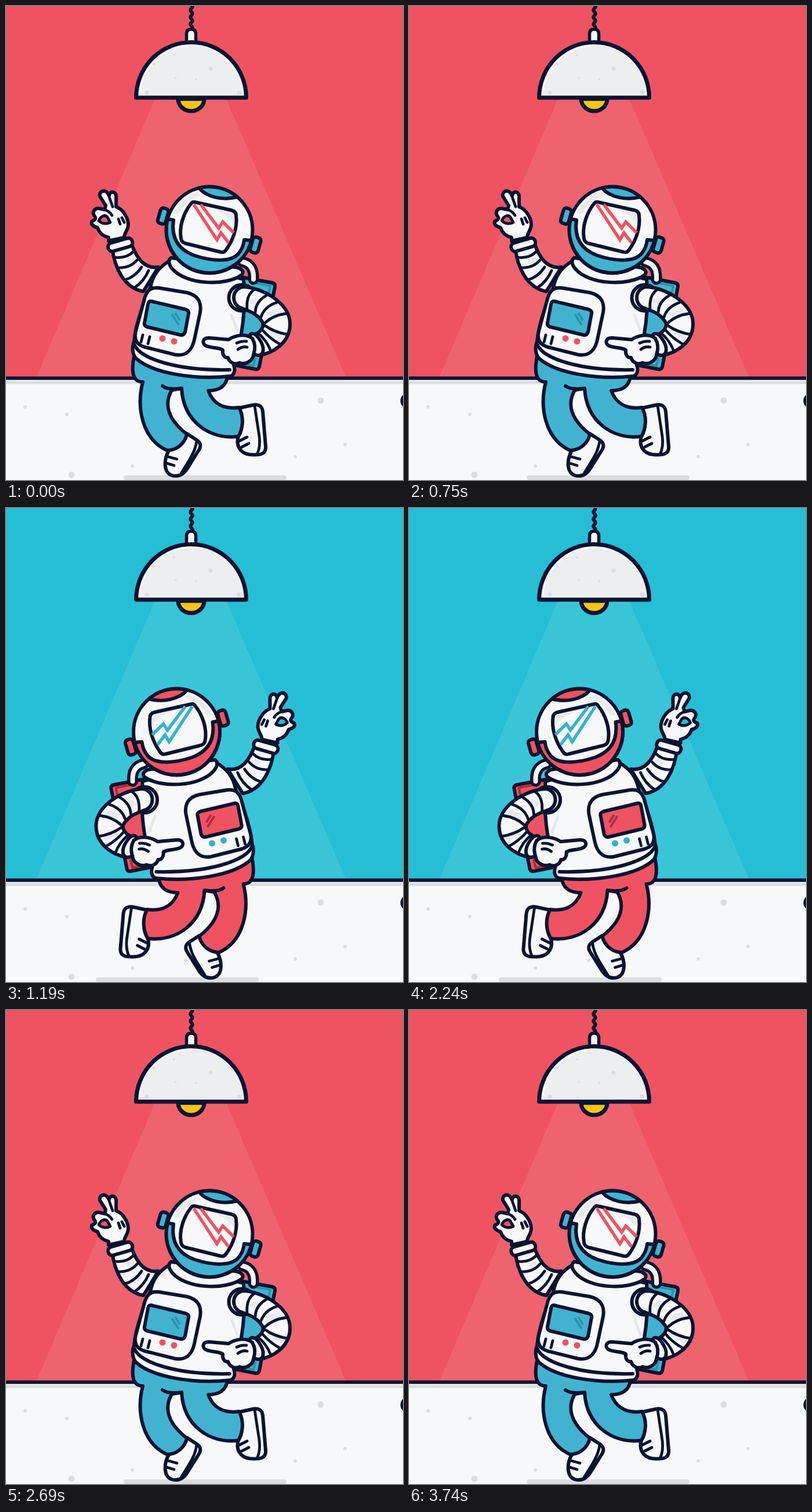
Recreate the animation shown at these times as an HTML page. Size 685 by 817 pixels, loop 3.96 s.

```html
<!DOCTYPE html>
<html lang="en">
<head>
<meta charset="utf-8">
<title>Dancing astronaut</title>
<style>
  html, body { margin: 0; width: 100%; height: 100%; overflow: hidden; }
  svg {
    display: block; width: 100vw; height: 100vh;
    --bg: #ef5361; --beam: #ee636e; --suit: #41b3d0; --shade: #2b93ad; --accent: #ef5361;
  }
  svg.blue {
    --bg: #26bed4; --beam: #39c5d8; --suit: #ef5361; --shade: #a92c40; --accent: #35b3cd;
  }
  .bg { fill: var(--bg); }
  .beam { fill: var(--beam); }
  .ink { stroke: #0b1330; stroke-width: 6; stroke-linecap: round; stroke-linejoin: round; fill: none; }
  .ink .white { fill: #f7f8fa; }
  .ink .suit { fill: var(--suit); }
  .ink .hole { fill: var(--bg); }
  .thin { stroke-width: 4.8; }
  .ink .soft { fill: #e9eaed; stroke: none; }
  .ink .fold { stroke: #e6e7ea; stroke-width: 5; }
  .ink .shade { stroke: var(--shade); stroke-width: 4; }
  .ink .bolt { stroke: var(--accent); stroke-width: 5.5; stroke-linecap: butt; stroke-linejoin: miter; }
  .ink .light { fill: var(--accent); stroke: none; }
  .spots { fill: #dcdde1; }
</style>
</head>
<body>
<svg id="stage" viewBox="0 0 685 817" preserveAspectRatio="none">
  <rect class="bg" width="685" height="817"/>
  <path class="beam" d="M257 160H380L587 641H52Z"/>

  <g id="floor">
    <rect y="641" width="685" height="176" fill="#f7f8fa"/>
    <rect y="646.5" width="685" height="5" fill="#dcdde1"/>
    <rect y="638.5" width="685" height="6" fill="#0b1330"/>
    <g class="spots" id="floorSpots"></g>
    <circle cx="694" cy="680.5" r="13.5" fill="#0b1330"/>
    <path id="shadow" d="M207 813H480" stroke="#dcdde1" stroke-width="8" stroke-linecap="round"/>
  </g>

  <g class="ink" id="lamp">
    <path id="cord"/>
    <path class="white" d="M311.500 61V48Q311.500 40 319.500 40Q327.500 40 327.500 48V61" stroke-width="5.500"/>
    <path d="M297 160A22.500 21 0 0 0 342 160Z" fill="#fac417" stroke-width="7"/>
    <path d="M224.500 158A95 95.500 0 0 1 414.500 158Z" fill="#edeef0" stroke-width="7"/>
    <path d="M231 149C235 104 271 70 316 68" stroke="#f8f9fb" stroke-width="3"/>
    <g class="spots" id="lampSpots" stroke="none"></g>
  </g>

  <g class="ink" id="dancer">
    <g id="backpack">
      <path class="suit" d="M405 467L459 477Q465 478 464 484L437 622Q436 627 430 626L385 617Z"/>
      <path class="shade" d="M428 477L456 482L452 500M430 607L427 620L402 616"/>
    </g>
    <path d="M408 441C423 444 428 455 427 471" stroke-width="19"/>
    <path d="M408 441C423 444 428 455 427 471" stroke="#f7f8fa" stroke-width="8"/>

    <g id="raisedArm">
      <path class="white" d="M183 415C187 452 204 486 237 492L263 450C238 454 224 432 216 408Z"/>
      <path class="soft" d="M206 436L219 432L223 441L211 446ZM218 459L230 449L239 454L227 468Z"/>
      <path class="thin" d="M187 433Q207 436 220 423M193 451Q214 452 226 438M205 472Q223 467 234 450M221 486Q238 475 246 456"/>
      <rect class="white" x="175.500" y="404" width="43" height="15" rx="7" transform="rotate(-16 197 411)"/>
      <path class="white" d="M177 405L177 399C169 397 161 392 158 382C151 380 146 377 148 371C155 368 156 366 152 361C148 354 154 348 161 349L170 351L172 344L162 328C160 319 170 316 175 322L178 327C179 318 190 319 190 328L190 346C201 350 210 363 211 376C211 387 204 390 204 399L177 405"/>
      <path class="hole thin" d="M160 370C163 362 171 359 175 364L180 373C173 376 166 376 160 370Z"/>
      <path class="thin" d="M177 326L184 346M170 351Q179 354 183 361M194 367L197 376M200 365L204 373"/>
    </g>

    <g id="legs">
      <path class="white" d="M281 766C271 784 273 805 286 809C299 813 307 806 313 797L333 765C338 757 334 751 329 748L312 737Z"/>
      <path class="thin" d="M329 749C327 770 313 787 302 806M280 777L295 781M277 788L290 792"/>
      <path class="white" d="M402 693C410 711 408 732 401 741C396 757 404 771 420 773C440 775 449 772 448 759L443 699C442 688 434 686 425 688Z"/>
      <path class="thin" d="M429 689L436 735C439 751 438 763 433 773M402 750L416 743M407 760L419 754"/>
      <path class="suit" d="M221 603C217 625 216 648 236 648C225 691 234 746 278 766C294 766 309 754 312 738C284 716 270 690 286 662L303 659C306 715 350 748 401 742C409 728 411 708 402 692C379 695 358 688 349 663C369 663 380 655 382 638Z"/>
      <path d="M270 655Q279 662 303 659"/>
    </g>

    <g id="torso">
      <path class="white" d="M284 438C264 450 253 463 249 486C241 503 224 545 221 578C217 588 218 600 224 607C252 633 326 645 387 638C394 636 396 628 393 619C408 570 414 525 410 471Z"/>
      <path class="fold" d="M389 533L399 559"/>
      <path d="M221 583C231 609 298 629 386 627"/>
      <path class="white" d="M264 486L312 494C330 498 338 510 335 528L325 575C321 594 310 604 292 601L240 588C226 584 220 575 224 560L238 508C242 490 250 484 264 486Z"/>
      <path class="suit" d="M251 509L310 523Q316 525 315 530L309 562Q307 568 301 567L243 553Q238 551 239 546L245 514Q246 508 251 509Z"/>
      <path class="shade" d="M286 531L298 550M292 529L300 542" stroke-linecap="butt"/>
      <circle class="light" cx="270" cy="573" r="5.500"/>
      <circle class="light" cx="290" cy="578" r="5.500"/>
      <path class="thin" d="M236 567L233 579M248 570L245 582"/>
    </g>

    <g id="head">
      <path class="white" d="M285 434C279 438 281 446 287 453C311 481 379 483 406 464C412 458 407 454 400 451Z"/>
      <rect class="suit" x="264" y="348.500" width="14" height="27" rx="5" transform="rotate(16 271 362)"/>
      <rect class="suit" x="423.500" y="398.500" width="14" height="27" rx="5" transform="rotate(16 430.500 412)"/>
      <circle class="white" cx="351" cy="386" r="74.500"/>
      <path class="soft" d="M289 358C299 337 314 325 331 321L336 327C320 331 307 341 299 357Z"/>
      <path class="suit" d="M333 313.700A74.500 74.500 0 0 1 399 329C377 335 347 331 333 313.700Z"/>
      <path class="suit" d="M279 367L289 369C285 397 295 419 325 430C358 441 389 441 401 427C408 419 410 412 411 403L423.500 404A74.500 74.500 0 0 1 279 367Z"/>
      <path class="white" d="M326 338L389 352Q397 354 397 361C400 384 390 406 380 420Q376 426 370 424L309 409Q303 407 302 401C298 380 307 356 319 341Q322 337 326 338Z"/>
      <path class="soft" d="M357 349L388 356L394 363L394 374L379 361Z"/>
      <path class="bolt" d="M324 342L364 403L371 391L384 408M336 342L367 383L374 372L393 391"/>
    </g>

    <g id="bentArm">
      <circle class="white" cx="407" cy="503" r="22.500"/>
      <path class="white" d="M409 484C441 485 492 512 490 550C489 580 462 598 437 602L425 568C440 563 447 552 442 544C434 532 424 527 407 521C388 516 388 488 409 484Z"/>
      <path class="soft" d="M418 508L431 502L443 509L430 520ZM449 528L471 520L480 533L453 539ZM454 552L483 562L474 575L451 561Z"/>
      <path class="thin" d="M428 489Q414 498 416 523M449 499Q431 509 430 528M467 511Q446 518 440 536M484 530Q461 533 447 546M486 566Q464 563 447 551M473 583Q456 574 442 558M457 595Q450 576 434 563"/>
      <path class="white" d="M420 570C420 563 429 563 434 570C442 580 445 590 443 597C439 605 430 602 427 598Z"/>
      <path class="white" d="M425 573C415 564 396 567 384 575L350 572C339 572 337 582 346 586C356 590 367 588 374 593C373 601 377 607 383 606C386 615 395 619 403 615C413 619 426 612 427 601C431 590 429 580 425 573Z"/>
      <path class="thin" d="M398 581Q406 577 415 578M400 592Q408 586 416 588"/>
    </g>
  </g>
</svg>
<script>
  const LOOP = 3960;
  const SWITCHES = [300, 750, 1190, 1790, 2240, 2690, 3290, 3740];
  const byId = id => document.getElementById(id);

  const addSpots = (id, spots) => {
    byId(id).innerHTML = spots
      .map(([x, y, r]) => `<circle cx="${x}" cy="${y}" r="${r}"/>`).join("");
  };
  addSpots("floorSpots", [
    [33, 691, 3], [105, 704, 3], [543, 680, 5.5], [585, 756, 3],
    [499, 777, 3], [218, 793, 3], [113, 808, 5.5], [310, 780, 3]
  ]);
  addSpots("lampSpots", [
    [290, 85, 2], [353, 108, 3.5], [255, 100, 2.5], [293, 124, 1.5],
    [328, 126, 2], [243, 149, 3.5], [402, 149, 3.5]
  ]);

  const cord = Array.from({ length: 43 }, (_, i) =>
    `${(320 + 1.8 * Math.sin(i * 0.52)).toFixed(1)} ${i - 2}`);
  byId("cord").setAttribute("d", "M" + cord.join("L"));

  const stage = byId("stage"), dancer = byId("dancer"), shadow = byId("shadow");

  function render(time) {
    const t = time % LOOP;
    const blue = SWITCHES.filter(s => t >= s).length % 2 === 1;
    stage.classList.toggle("blue", blue);
    dancer.setAttribute("transform", blue ? "translate(645.5 0) scale(-1 1)" : "");
    shadow.setAttribute("transform", blue ? "translate(-48 0)" : "");
  }

  const start = performance.now();
  function tick() {
    render(performance.now() - start);
    requestAnimationFrame(tick);
  }
  tick();
</script>
</body>
</html>
```
